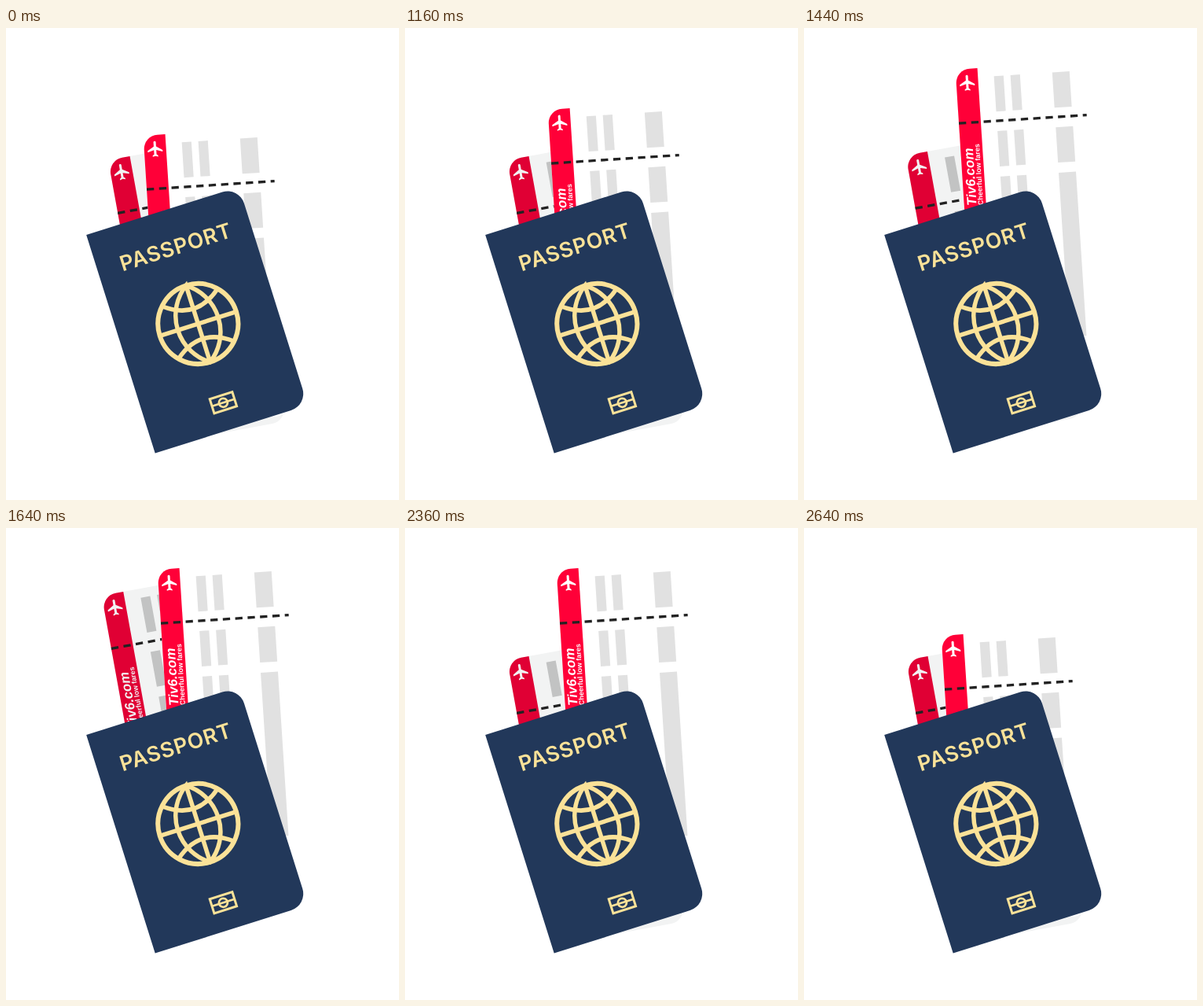
These frames come from a looping animation (500x600 px, 5 s). An HTML page:

```html
<!DOCTYPE html>
<html lang="en">
<head>
<meta charset="utf-8">
<title>Passport and boarding passes</title>
<style>
  html, body { margin: 0; width: 100%; height: 100%; overflow: hidden; background: #fff; }
  svg { display: block; width: 100%; height: 100%; }
  .brand { font: italic bold 17px "Liberation Sans", Arial, sans-serif; }
  .slogan { font: bold 9px "Liberation Sans", Arial, sans-serif; }
  .title { font: 600 26.8px Inter, sans-serif; letter-spacing: .7px; text-anchor: middle; }
</style>
</head>
<body>
<svg viewBox="0 0 500 600">
  <g id="back"></g>
  <g id="front"></g>
  <g transform="translate(102.2 263) rotate(-17.5)">
    <path fill="#22385a" d="M0 0H181.5a22 22 0 0 1 22 22V269a22 22 0 0 1 -22 22H0Z"/>
    <text class="title" x="103.8" y="58.3" fill="#fbe298">PASSPORT</text>
    <g fill="none" stroke="#fbe298">
      <g transform="translate(101.6 150.5)" stroke-width="5.5">
        <circle r="51" stroke-width="6"/>
        <path d="M0 -51A61.7 61.7 0 0 1 0 51A61.7 61.7 0 0 1 0 -51V51"/>
        <path d="M-51 0H51M-37 -35Q0 -5 37 -35M-37 35Q0 5 37 35"/>
      </g>
      <g transform="translate(102 255.8)" stroke-width="3">
        <rect x="-15" y="-9.5" width="30" height="19"/>
        <circle r="5.5" stroke-width="2.7"/>
        <path d="M-15 0H15" stroke-width="2.7"/>
      </g>
    </g>
  </g>
</svg>
<script>
const LOOP = 5000, STEP = 40;
const rows = [[11.5, 45], [81.4, 45], [139.3, 209]];
const columns = [[48.4, 12.2], [69.4, 12.2], [122.7, 22]];
const plane = 'M21 16v-2l-8-5V3.5c0-.83-.67-1.5-1.5-1.5S10 2.67 10 3.5V9l-8 5v2l8-2.5V19l-2 1.5V22l3.5-1 3.5 1v-1.5L13 19v-5.5l8 2.5z';

function ticket(paper, red, grey) {
  const bars = rows.map(([y, h]) =>
    columns.map(([x, w]) => `M${x} ${y}h${w}v${h}h${-w}z`).join('')).join('');
  return `
    <path fill="${paper}" d="M0 367V18A18 18 0 0 1 18 0H163.5V349a18 18 0 0 1 -18 18Z"/>
    <path fill="${red}" d="M0 367V18A18 18 0 0 1 18 0H28V367Z"/>
    <path fill="${grey}" d="${bars}"/>
    <path stroke="#222" stroke-width="3.3" stroke-dasharray="9.3 6.5" d="M0 68.4H163"/>
    <g fill="${paper}">
      <path d="${plane}" transform="translate(2.4 5.7)"/>
      <g transform="translate(0 174) rotate(-90)">
        <text class="brand" y="15.8">Tiv6.com</text>
        <text class="slogan" y="24.2">Cheerful low fares</text>
      </g>
    </g>`;
}

const back = document.getElementById('back');
const front = document.getElementById('front');
back.innerHTML = ticket('#f2f3f3', '#e00034', '#c2c3c3');
front.innerHTML = ticket('#fff', '#ff0038', '#e1e1e1');

function ease(time, start, duration) {
  const p = Math.min(1, Math.max(0, (time - start) / duration));
  return p * p * (3 - 2 * p);
}

function place(node, x, y, dx, dy, lift, angle) {
  node.setAttribute('transform', `translate(${x + dx * lift} ${y + dy * lift}) rotate(${angle})`);
}

function draw(now) {
  const time = Math.floor(now % LOOP / STEP) * STEP;
  const frontLift = ease(time, 1040, 280) - ease(time, 2480, 160);
  const backLift = ease(time, 1400, 240) - ease(time, 2160, 200);
  place(front, 174.6, 136.9, 18, -84, frontLift, -3.7);
  place(back, 130, 168, -8.3, -82, backLift, -10.3);
}

const begin = performance.now();
function tick() {
  draw(performance.now() - begin);
  requestAnimationFrame(tick);
}
tick();
</script>
</body>
</html>
```
